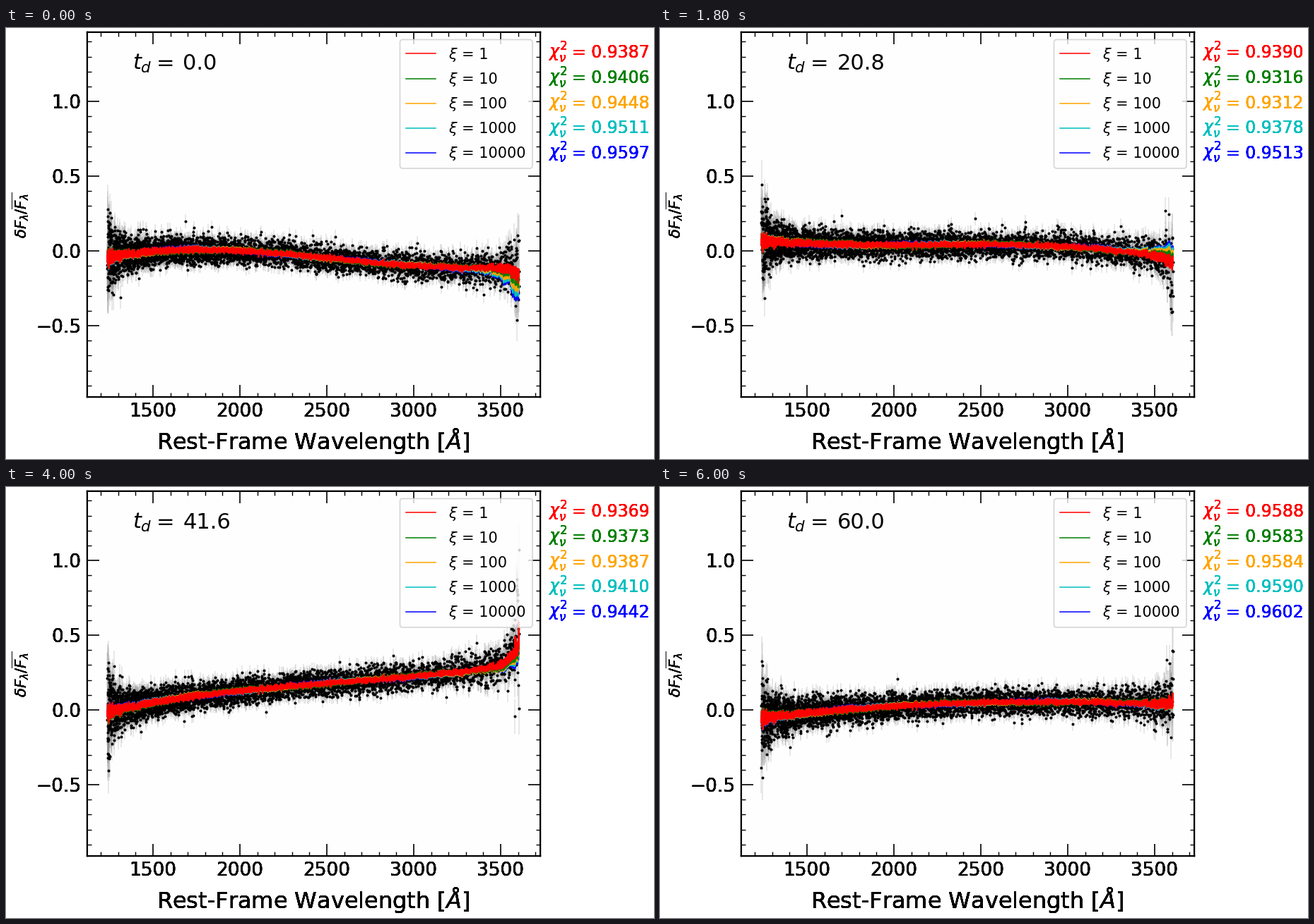
These frames come from a looping animation (917 by 611 pixels, 6200 ms). A matplotlib script:

```python
import numpy as np
import matplotlib.pyplot as plt
from matplotlib.animation import FuncAnimation
from matplotlib.collections import LineCollection
from matplotlib.lines import Line2D
from matplotlib.patches import FancyBboxPatch
from matplotlib.ticker import MultipleLocator
from matplotlib.transforms import Affine2D

W, H, DPI = 917, 611, 100
FRAMES, STEP = 31, 200
COLORS = ["red", "green", "orange", "c", "blue"]
LAYERS = 6  # stacked drawing gives the heavy lettering outside the plot

plt.rcParams["font.family"] = "DejaVu Sans"
plt.rcParams["mathtext.fontset"] = "dejavusans"

# Key epochs: step, day, flux at four wavelengths, chi square at xi = 1, 100, 10000
NODES = np.array([1240, 2000, 2800, 3500])
EPOCHS = np.array([
    (0, 0.0, -.040, .000, -.080, -.108, .9387, .9448, .9597),
    (3, 8.0, .045, .115, .142, .172, .9092, .9081, .9085),
    (9, 20.8, .070, .040, .038, -.030, .9390, .9312, .9513),
    (13, 29.5, .045, -.055, -.118, -.155, .9785, .9675, .9688),
    (20, 41.6, -.010, .127, .205, .290, .9369, .9387, .9442),
    (25, 49.9, -.035, .115, .176, .230, .9404, .9384, .9421),
    (30, 60.0, -.052, .024, .054, .040, .9588, .9584, .9602),
])

# Logarithmic wavelength grid and its noise profile
wave = 10 ** np.arange(np.log10(1237), np.log10(3606), 1e-4)
blue_side, red_side = wave - 1237, wave - 3606
edge = np.exp(red_side / 28)
sigma = (.044 + .030 * np.exp(-blue_side / 200) + .095 * np.exp(-blue_side / 35)
         + .030 * np.exp(red_side / 250) + .105 * edge)
ripple = np.random.default_rng(7).normal(size=wave.size)


def scaled(x):
    return (x - 2370) / 753


def epoch(i):
    """Day, cubic flux curve and the five chi squares at step i."""
    day, *rest = (np.interp(i, EPOCHS[:, 0], col) for col in EPOCHS.T[1:])
    cubic = np.polyfit(scaled(NODES), rest[:4], 3)
    chi = np.polyval(np.polyfit([0, 2, 4], rest[4:], 2), range(5))
    return day, cubic, chi


fig = plt.figure(figsize=(W / DPI, H / DPI), dpi=DPI, facecolor="white")
px = Affine2D().scale(1 / W, -1 / H).translate(0, 1) + fig.transFigure


def write(x, y, s, size, layers=1, **kw):
    kw = {"va": "baseline", **kw}
    return [fig.text(x, y, s, fontsize=size, transform=px, **kw)
            for _ in range(layers)]


def make_axes(z):
    ax = fig.add_axes([114.5 / W, 1 - 523 / H, 641 / W, 517 / H],
                      zorder=z, facecolor="#fefefe")
    ax.set(xlim=(1119.5, 3725.8), ylim=(-.977, 1.4636))
    for axis, major in ((ax.xaxis, 500), (ax.yaxis, .5)):
        axis.set_major_locator(MultipleLocator(major))
        axis.set_minor_locator(MultipleLocator(major / 5))
    ax.tick_params(which="both", direction="in", top=True, right=True)
    ax.tick_params(which="major", length=12, width=1.2, labelsize=19, pad=6)
    ax.tick_params(which="minor", length=4.5, width=1)
    for spine in ax.spines.values():
        spine.set_linewidth(1.5)
    return ax


ax = [make_axes(z - LAYERS) for z in range(LAYERS)][-1]

# Data and models
bars = LineCollection([], colors="gray", linewidths=1.2, alpha=.2, zorder=1)
ax.add_collection(bars, autolim=False)
dots, = ax.plot([], [], "o", color="black", ms=2.9, mew=0, zorder=2)
models = [ax.plot([], [], color=c, lw=1.5, zorder=4 - .1 * k)[0]
          for k, c in enumerate(COLORS)]

# Labels
write(434.5, 597, r"Rest-Frame Wavelength [$\AA$]", 23, LAYERS, ha="center")
write(20.5, 265, r"$\delta F_\lambda/\overline{F_\lambda}$", 15.3, LAYERS,
      rotation=90, ha="center", va="center")
write(179, 59, "$t_d$", 22)
write(212.5, 59, "=", 22)
day_text = write(250.5, 59, "", 22)[0]

# Legend and fit quality
fig.add_artist(FancyBboxPatch(
    (557.5, 16.5), 187.5, 182.5, boxstyle="round,pad=0,rounding_size=4",
    fc="white", ec="0.8", lw=1.2, alpha=.8, transform=px, zorder=1))
scores = []
for k, color in enumerate(COLORS):
    y = 44 + 35.1 * k
    fig.add_artist(Line2D([566, 608], [y - 7.6] * 2, color=color, lw=1.1,
                          transform=px, zorder=2))
    write(625.5, y, r"$\xi$", 15)
    write(645.3, y, f"= {10 ** k}", 15)
    y = 42.5 + 35.6 * k
    write(767, y, r"$\chi^2_\nu$", 17, LAYERS, color=color)
    scores.append(write(801, y, "", 17, LAYERS, color=color))


def update(i):
    rng = np.random.default_rng(1000 + i)
    day, cubic, chis = epoch(i)
    mean = np.polyval(cubic, scaled(wave)) * (1 + .2 * np.exp(red_side / 60))

    noise, skew = rng.normal(size=(2, wave.size))
    y = mean * (1 + edge * np.abs(skew)) + .97 * sigma * noise
    dots.set_data(wave, y)
    ends = np.stack([y - sigma, y + sigma], 1)
    bars.set_segments(np.stack([np.stack([wave, wave], 1), ends], 2))

    # Models part at the red end, against the cubic bend of the curve
    fit = mean * (1 + .35 * edge * np.abs(ripple)) + .21 * sigma * ripple
    tail = -6 * cubic[0] * np.exp(red_side / 90) * (1 + .25 * np.sin(wave / 9))
    for k, line in enumerate(models):
        wiggle = .005 * np.sin(wave / 170 + k + .4 * i) * (k > 0)
        line.set_data(wave, fit + tail * k / 4 + wiggle)

    day_text.set_text(f"{day:.1f}")
    for texts, chi in zip(scores, chis):
        for t in texts:
            t.set_text(f"= {chi:.4f}")
    return [bars, dots, *models, day_text]


anim = FuncAnimation(fig, update, frames=FRAMES, interval=STEP,
                     repeat=True, repeat_delay=0, blit=False)
plt.show()
```
